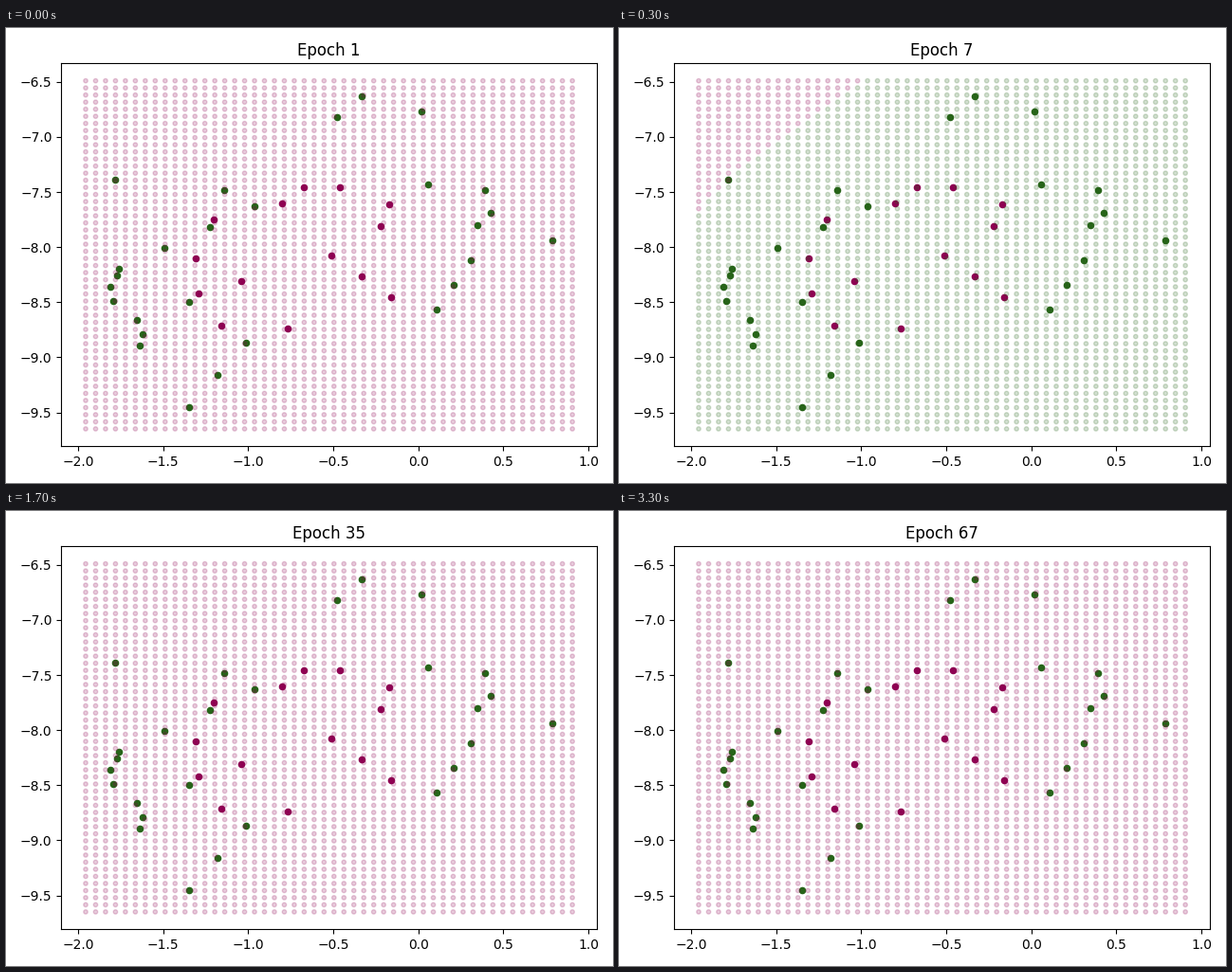
A matplotlib script that plays this animation: 640 by 480 pixels, repeating every 3350 ms.

```python
import numpy as np
import matplotlib.pyplot as plt
from matplotlib.animation import FuncAnimation
from matplotlib.colors import to_rgba

EPOCHS, INTERVAL = 67, 50
PINK, GREEN = "#8e0152", "#276419"


def trail(n, *keys):
    """n dots spread evenly along the path through the key points."""
    t = np.linspace(0, len(keys) - 1, n)
    return [np.interp(t, range(len(keys)), axis) for axis in zip(*keys)]


outer = [
    trail(3, (-0.48, -6.82), (-0.33, -6.63), (0.02, -6.77)),
    trail(3, (0.06, -7.43), (0.79, -7.94)),
    trail(5, (0.39, -7.48), (0.31, -8.12), (0.11, -8.57)),
    trail(3, (-1.78, -7.39), (-1.14, -7.48), (-1.35, -8.50)),
    trail(4, (-0.96, -7.63), (-1.76, -8.20)),
    trail(6, (-1.77, -8.26), (-1.84, -8.43), (-1.61, -8.72), (-1.64, -8.89)),
    trail(3, (-1.01, -8.87), (-1.35, -9.45)),
]
inner = [
    trail(4, (-0.80, -7.60), (-0.61, -7.38), (-0.17, -7.61)),
    trail(4, (-1.20, -7.75), (-1.36, -8.28), (-1.16, -8.71)),
    trail(3, (-0.51, -8.08), (-0.16, -8.45)),
    trail(3, (-1.04, -8.31), (-0.77, -8.74), (-0.22, -7.81)),
]

# unit grid: u runs right, v runs down
side = np.linspace(0, 1, 50)
u, v = (a.ravel() for a in np.meshgrid(side, side))


def predict(epoch):
    """Class per grid dot: a boundary sweeping from lower right to upper left."""
    slope = 1.253 - 0.114 * (epoch - 4)
    limit = 1.84 - 0.5 * (epoch - 4)
    bulge = 1.3 * u * (1 - u) * v * (1 - v)
    green = u + slope * v + bulge > limit
    # a uniform prediction is drawn in the lowest shade
    return green & ~green.all()


fig, ax = plt.subplots(figsize=(6.4, 4.8), dpi=100)
for paths, color in ((outer, GREEN), (inner, PINK)):
    ax.scatter(*np.hstack(paths), s=20, color=color, zorder=1)
shades = np.array([to_rgba(PINK, 0.2), to_rgba(GREEN, 0.2)])
grid = ax.scatter(-1.955 + 2.861 * u, -6.4915 - 3.157 * v, s=10,
                  color=shades[0], zorder=2)
title = ax.set_title("Epoch 1")
for _ in range(3):  # let the layout settle
    fig.tight_layout()


def update(i):
    epoch = i + 1
    grid.set_color(shades[predict(epoch).astype(int)])
    title.set_text(f"Epoch {epoch}")
    return grid, title


anim = FuncAnimation(fig, update, frames=EPOCHS, interval=INTERVAL,
                     repeat=True, repeat_delay=0)
plt.show()
```
